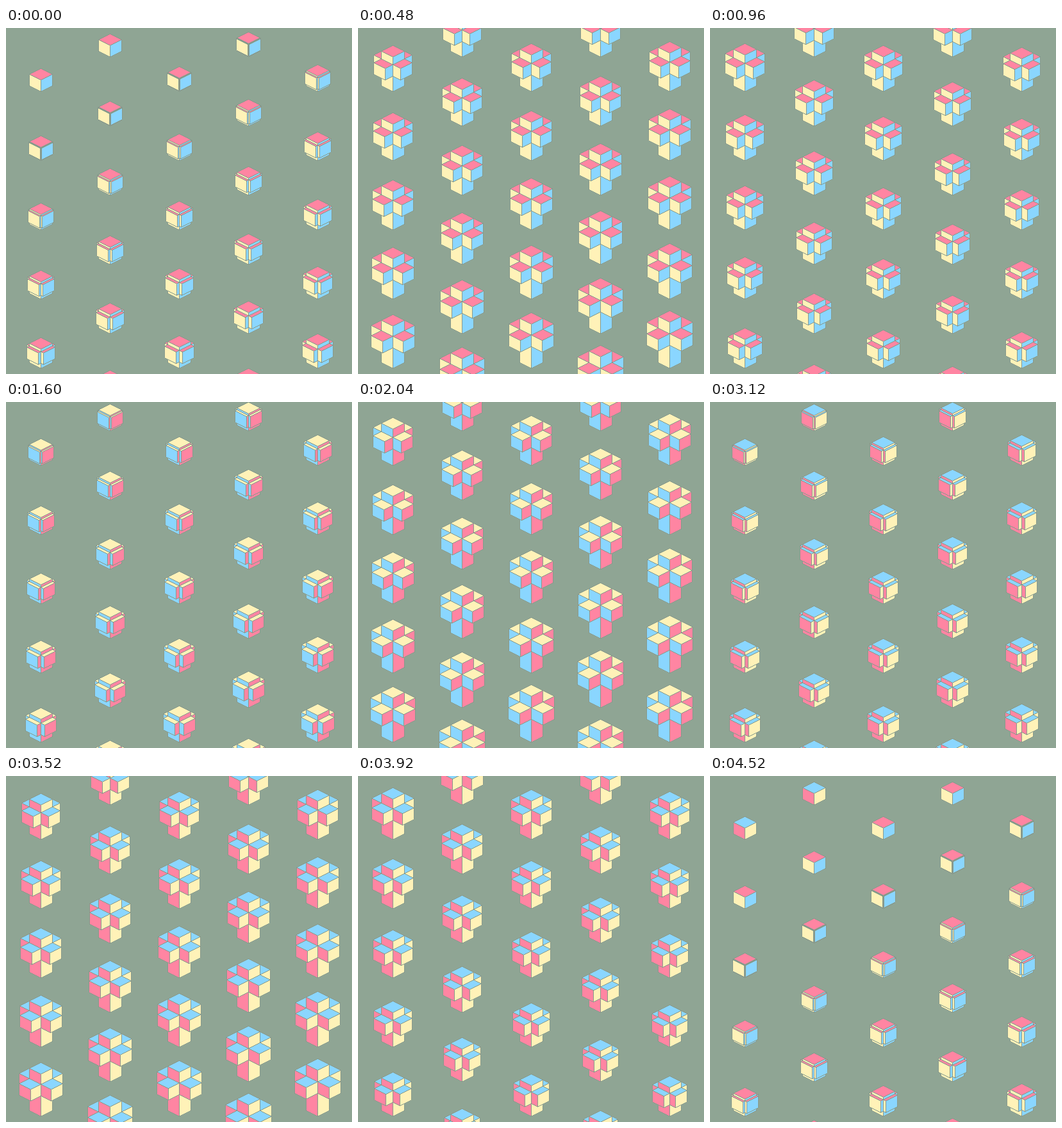
These frames come from a looping animation (540x540 px, 4560 ms). An HTML page with a canvas:

```html
<!DOCTYPE html>
<html>
<head>
<meta charset="utf-8">
<style>
html, body { margin: 0; width: 100%; height: 100%; overflow: hidden; background: #8fa594; }
canvas { display: block; }
</style>
</head>
<body>
<canvas id="stage" width="540" height="540"></canvas>
<script>
const ctx = document.getElementById('stage').getContext('2d');
const PINK = '#ff85a2', CREAM = '#fff2b8', BLUE = '#8ad6ff';
const BACK = '#8fa594', LINE = '#889a8c';
// top, left and right face colours of each pass
const PALETTES = [[PINK, CREAM, BLUE], [CREAM, BLUE, PINK], [BLUE, PINK, CREAM]];
const EDGE = 18, PASS = 38, FRAME = 40, LOOP = 4560;

// crisp one-pixel edge
function line([x0, y0], [x1, y1]) {
  if (x0 > x1) return line([x1, y1], [x0, y0]);
  if (x0 === x1) {
    const top = Math.floor(Math.min(y0, y1));
    ctx.fillRect(x0, top, 1, Math.floor(Math.max(y0, y1)) - top + 1);
    return;
  }
  const slope = (y1 - y0) / (x1 - x0);
  for (let x = x0; x <= x1; x++) ctx.fillRect(x, Math.floor(y0 + (x - x0) * slope), 1, 1);
}

function face(points, color) {
  ctx.fillStyle = color;
  ctx.beginPath();
  for (const [x, y] of points) ctx.lineTo(x + 0.5, y + 0.5);
  ctx.fill();
  ctx.fillStyle = LINE;
  points.forEach((p, i) => line(p, points[(i + 1) % 4]));
}

// tower of four cubes with four arms on the third one, pulled apart by d
function cross(ox, oy, d, colors) {
  const at = (x, y, z) => [ox + x - y, oy + (x + y) / 2 - z];
  const box = (x, y, z, w, l, h) => {
    const X = x + w, Y = y + l, Z = z + h;
    face([at(x, y, Z), at(X, y, Z), at(X, Y, Z), at(x, Y, Z)], colors[0]);
    face([at(x, Y, Z), at(X, Y, Z), at(X, Y, z), at(x, Y, z)], colors[1]);
    face([at(X, y, Z), at(X, Y, Z), at(X, Y, z), at(X, y, z)], colors[2]);
  };
  const z = 2 * d;
  if (d) {
    box(-d, 0, z, d, EDGE, EDGE);
    box(0, -d, z, EDGE, d, EDGE);
  }
  box(0, 0, 0, EDGE, EDGE, EDGE + 3 * d);
  if (d) {
    box(EDGE, 0, z, d, EDGE, EDGE);
    box(0, EDGE, z, EDGE, d, EDGE);
  }
}

function draw(now) {
  const frame = Math.floor((now % LOOP) / FRAME);
  ctx.fillStyle = BACK;
  ctx.fillRect(0, 0, 540, 540);
  for (let col = 0; col < 5; col++) {
    for (let row = 0; row < 6; row++) {
      const n = frame + row + (col >> 1);
      const step = n % PASS;
      const d = Math.min(step, PASS - 1 - step);
      cross(54 + col * 108, (col % 2 ? 27 : 81) + row * 108, d, PALETTES[Math.floor(n / PASS) % 3]);
    }
  }
}

const start = performance.now();
function tick() {
  draw(performance.now() - start);
  requestAnimationFrame(tick);
}
tick();
</script>
</body>
</html>
```
